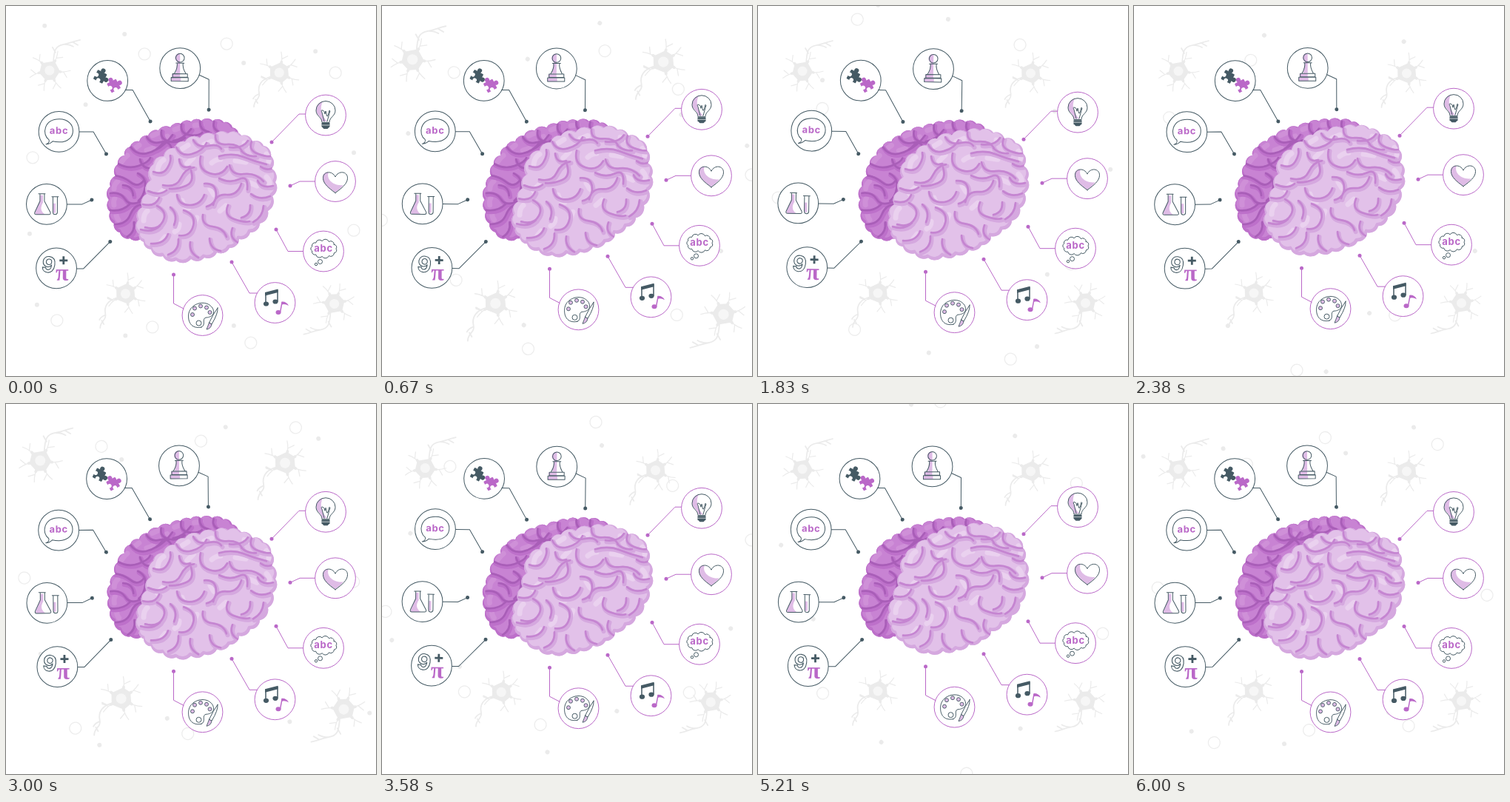
Write an HTML page that moves like this. It is 500 px wide and 500 px high and loops after 6040 ms.

```html
<!DOCTYPE html>
<html lang="en">
<head>
<meta charset="utf-8">
<title>Brain skills</title>
<style>
html, body { margin: 0; width: 100%; height: 100%; overflow: hidden; background: #fff; }
svg { display: block; width: 100vw; height: 100vh; }
path, line { stroke-linecap: round; stroke-linejoin: round; }
.line { fill: none; }
.ink { fill: none; stroke: #455a64; }
.solid { fill: #455a64; }
.lilac { fill: #dfbce6; }
.pink { fill: #ba68c8; }
.word { font: 700 13px Inter, "Open Sans", sans-serif; letter-spacing: .7px; text-anchor: middle; fill: #ba68c8; }
</style>
</head>
<body>
<svg id="stage" viewBox="0 0 500 500">
  <g id="orbit" fill="none" stroke="#ededed" stroke-width="1.3"></g>
  <g id="neurons" fill="none" stroke="#ebebeb"></g>

  <g id="left">
    <g id="darkHalf"></g>
    <g id="leftLinks"></g>

    <g id="pawn">
      <path class="lilac" d="M231 77L229 91H235V64A6 6 0 0 0 231 75ZM224 91.500h11v5h-11zM223 97h13v4.500h-13z"/>
      <circle class="ink" cx="235" cy="70" r="5.800"/>
      <path class="ink" d="M229.500 77h11M231 77C232 84 229 88 227 91.500M239 77C238 84 241 88 243 91.500M225 91.500h20v4.500h-20zM223 96.500h23v5h-23z"/>
    </g>

    <g id="puzzle"></g>

    <g id="speech">
      <path class="ink" d="M58 181C48 174 51 153 72 153C96 153 97 184 72 184C68 184 65 183.500 63 183C60 186 57 187 54 187C57 186 59 184 58 181Z"/>
      <text class="word" x="71.500" y="173">abc</text>
    </g>

    <g id="lab">
      <path class="lilac" d="M46 263L39.500 279Q39 282 42 282H53Q44 276 50 266V256H46ZM63.500 267h3.500v13h-3.500z"/>
      <path class="ink" d="M44 254h9M46 254V264L39 279Q38 282 41 282H58Q61 282 60 279L52 264V254M62 258h9M63.500 258V279a3 3 0 0 0 6 0V258"/>
    </g>

    <g id="maths">
      <text x="58" y="360" text-anchor="middle" transform="rotate(8 58 350)" fill="#fff" stroke="#455a64" stroke-width="1.100" style="font:700 29px Inter,sans-serif">9</text>
      <path class="ink" stroke-width="2.800" style="stroke-linecap:butt" d="M72.500 344h11M78 338.500v11"/>
      <text x="76" y="371" text-anchor="middle" class="pink" style="font:700 32px 'Liberation Serif',serif">π</text>
    </g>
  </g>

  <g id="right">
    <g id="lightHalf"></g>
    <g id="rightLinks"></g>

    <g id="bulb">
      <path class="lilac" d="M427 156C427 149 419 148 419 140C419 134 423 130 428 129C423 139 427 149 434 156Z"/>
      <path class="ink" d="M427 157C427 150 419 149 419 141A13 12.500 0 0 1 445 141C445 149 437 150 437 157ZM430 156L427 144Q425 140 428 141T431 146Q432 138 433 146T437 141Q439 141 437 145L434 156"/>
      <path class="solid" d="M426.500 158h11v5l-3 3h-5l-3-3z"/>
      <path d="M427 161h10" stroke="#fff" stroke-width=".7"/>
    </g>

    <g id="heart">
      <path class="lilac" d="M445 252C436 246 428 240 428 232C428 226 432 224 436 225C432 233 442 244 456 242C453 246 449 249 445 252Z"/>
      <path class="ink" d="M445 252.500C436 246 428.500 240 428.500 232.500C428.500 223 441 222 445 231C449 222 461.500 223 461.500 232.500C461.500 240 454 246 445 252.500Z"/>
    </g>

    <g id="thought">
      <path id="cloud" class="ink"/>
      <circle class="ink" cx="424.500" cy="345.500" r="3"/>
      <circle class="ink" cx="419" cy="349" r="1.700"/>
      <text class="word" x="429" y="332">abc</text>
    </g>

    <g id="music">
      <ellipse class="solid" cx="351.500" cy="402.500" rx="3.600" ry="3.100"/>
      <ellipse class="solid" cx="364" cy="399.500" rx="3.600" ry="3.100"/>
      <path class="ink" stroke-width="1.500" d="M351 402V388M367 399V384"/>
      <path class="solid" d="M350 387L367.500 382.500V387L350 391.500Z"/>
      <ellipse class="pink" cx="368" cy="414" rx="3.500" ry="3"/>
      <path class="line" stroke="#ba68c8" stroke-width="1.500" d="M370.500 414L373 400.500"/>
      <path class="pink" d="M372.500 399.500Q379 399 382 405Q377 402 372.500 403.500Z"/>
    </g>

    <g id="palette">
      <path class="ink" d="M264 434C250 437 245 426 247 415C250 401 271 396 279 408C284 417 276 421 270 421C264 423 271 431 264 434Z"/>
      <g id="paints" class="lilac" stroke="#455a64" stroke-width=".9"></g>
      <circle class="ink" cx="260.500" cy="428.500" r="3.500"/>
      <path fill="#fff" stroke="#455a64" d="M286 408Q287 415 278 430L274.500 428Q280 416 286 408Z"/>
      <path class="lilac" stroke="#455a64" stroke-width=".9" d="M274.500 428L278 430Q277 436 271 437Q273 432 274.500 428Z"/>
    </g>
  </g>
</svg>

<script>
const LOOP = 6040;
const BEAT = 1500;
const DARK = '#455a64', PINK = '#ba68c8';
const byId = id => document.getElementById(id);

function add(parent, tag, attrs) {
  const node = document.createElementNS('http://www.w3.org/2000/svg', tag);
  for (const key in attrs) node.setAttribute(key, attrs[key]);
  parent.appendChild(node);
  return node;
}

// Closed outline of outward bulges between clockwise points.
function bumps(points, round = .7) {
  const last = points[points.length - 1];
  let from = last, d = `M${last}`;
  for (const to of points) {
    const r = Math.hypot(to[0] - from[0], to[1] - from[1]) * round;
    d += `A${r} ${r} 0 0 1 ${to}`;
    from = to;
  }
  return d + 'Z';
}

const pairs = text => text.split(' ').map(p => p.split(',').map(Number));

// Brain
function hemisphere(id, outline, tone, folds, glow) {
  const group = byId(id), shape = bumps(outline);
  const clip = add(group, 'clipPath', { id: id + 'Clip' });
  add(clip, 'path', { d: shape });
  add(group, 'path', { d: shape, fill: tone.base });
  const inner = add(group, 'g', { 'clip-path': `url(#${id}Clip)`, fill: 'none' });
  add(inner, 'path', { d: shape, stroke: tone.shade, 'stroke-width': 5, transform: 'translate(-1 -2)' });
  add(inner, 'path', { d: glow, stroke: tone.glow, 'stroke-width': 7 });
  add(inner, 'path', { d: folds, stroke: tone.shade, 'stroke-width': 6, transform: 'translate(1.5 2)' });
  add(inner, 'path', { d: folds, stroke: tone.fold, 'stroke-width': 2.7 });
}

const darkOutline = pairs('183,314 168,314 154,306 146,294 141,278 139,262 141,244 148,230 151,214 160,202 168,190 180,183 192,175 206,168 222,164 236,159 250,156 264,155 279,155 294,157 306,164 314,174 314,200 200,300');
const lightOutline = pairs('180,308 178,290 184,272 190,254 195,236 199,214 213,203 228,192 242,183 262,178 282,174 300,172 318,175 333,183 348,189 358,203 359,220 364,238 360,257 354,277 343,294 330,306 315,315 302,327 285,333 268,340 250,342 230,344 212,338 196,329 186,319');

hemisphere('darkHalf', darkOutline,
  { base: '#c883d3', shade: '#bd70ca', fold: '#a95eb8', glow: '#cf90d8' },
  'M146 229q12 1 22 9t18-2M151 213q14 8 28 3t16-11M168 190q8 12 22 9t22-14M190 177q6 10 18 7t16 8' +
  'M210 168q-2 12 10 15t22-5M237 159q-2 13 10 15t18-3M262 156q0 12 12 14M281 156q-3 10 8 15' +
  'M141 253q14-2 20 8t22 3M141 276q16 2 26-8M147 295q16 0 21-13t16-14M164 312q11-7 9-20' +
  'M178 226q12 6 10 19t-9 18M158 242q13 1 14 14M181 207q4 14 16 12M225 174q-10 14-22 20M250 166q-10 14-24 16',
  'M146 247q0-6 5-10M156 211q4-6 8-9M172 194l8-6M146 269q-1-6 1-9M198 175l9-4M228 167l8-3M255 161l9-1M152 289q-3-4-3-8M190 195l9-3M212 179l6-3');

const upperFolds =
  'M230 191q6 13 21 9t20-15M253 181q6 11 20 8t18 4M283 174q-1 14 15 13t21 9M302 191q18 2 25-9' +
  'M332 183q-5 12 9 17t19 2M288 203q18-5 33 1t31 10M344 217q8 6 17 2M199 224q13 5 19-5t4-17' +
  'M212 242q18 4 24-9t18-15M263 203q-4 18 12 23t24-9M302 215q3 14 19 12t27 10M250 222q5 16-7 21t-22 4' +
  'M192 250q15 7 25-1M340 236q5 11 21 7M234 207q2 14 15 10M318 196q8 8 20 7';
const lowerFolds =
  'M268 240q15-1 16 13t-13 18M288 233q14 7 27 1t11 14M318 240q-5 16-20 15t-18 14M331 254q11 9 26 3' +
  'M231 255q2 14 17 14t20-14M185 268q17 4 22-9M204 270q15 8 8 21t-24 8M222 272q11 9 5 24' +
  'M240 276q17 6 13 21t-19 13M266 282q-2 14 13 16t19 14M300 269q-6 14 8 19t21 3M330 269q1 14-12 17' +
  'M348 270q-1 15-14 22M182 302q16 5 26-5M196 321q18 1 23-13M219 336q15-5 14-21M249 319q-2 14 11 21M275 314q1 15 15 17M306 300q-5 13 8 20';
hemisphere('lightHalf', lightOutline,
  { base: '#e2c1e9', shade: '#d5a8df', fold: '#c585d1', glow: '#ead1ef' },
  upperFolds + lowerFolds,
  'M205 222q1-10 8-14M238 193l8-5M268 187l10-4M322 185l9 3M352 200q4 6 3 10M186 290q0-9 5-13M205 258q4-7 9-10' +
  'M245 213l8-8M278 212q6-5 12-5M310 209l14 2M352 231q5 5 4 11M276 247l5 8M238 263q2 9 9 10M228 305q6-3 6-10M289 277l8-7M330 239l9 4M255 294l3-8M210 318l5-6');

// Callouts
function links(id, color, rows) {
  for (const [x, y, route, tip] of rows) {
    const g = byId(id);
    add(g, 'circle', { cx: x, cy: y, r: 27.4, fill: '#fff', stroke: color });
    add(g, 'path', { d: `M${route}L${tip}`, fill: 'none', stroke: color });
    const [cx, cy] = tip.split(' ');
    add(g, 'circle', { cx, cy, r: 2.5, fill: color });
  }
}
links('leftLinks', DARK, [
  [235, 84, '261 93L274 99', '274 140'],
  [137, 101, '161 113.500H171', '195 156'],
  [71.5, 170, '99 170H118', '135.500 200'],
  [55, 268, '82.500 268H103', '116 262'],
  [68.3, 354.5, '96 355H105', '141 318.500']
]);
links('rightLinks', PINK, [
  [432, 147.5, '404.500 146H396', '359 184'],
  [445, 237, '417.500 237H397', '384 243'],
  [429, 331.5, '401.500 331.500H381', '365 302'],
  [363.5, 401, '339 388H329', '305 346'],
  [265.5, 418, '240 409L226.500 402', '226.500 363']
]);

function puzzlePiece(x, y, fill, turn) {
  const g = add(byId('puzzle'), 'g', { transform: `translate(${x} ${y}) rotate(${turn})`, fill });
  add(g, 'rect', { x: -7, y: -7, width: 14, height: 14, rx: 1 });
  for (const [cx, cy] of [[9, 0], [0, -9]]) add(g, 'circle', { cx, cy, r: 3.1 });
  for (const [cx, cy] of [[-5.5, 0], [0, 5.5]]) add(g, 'circle', { cx, cy, r: 2.8, fill: '#fff' });
}
puzzlePiece(127, 95.5, DARK, 28);
puzzlePiece(145.500, 108, PINK, -28);

const cloud = Array.from({ length: 11 }, (_, i) => {
  const a = i / 11 * 2 * Math.PI;
  return [429.5 + 16.5 * Math.cos(a), 328 + 10.5 * Math.sin(a)];
});
byId('cloud').setAttribute('d', bumps(cloud, .56));

for (const [cx, cy] of pairs('252,417 255,408.5 263,405.5 271,407.5 275.5,414'))
  add(byId('paints'), 'circle', { cx, cy, r: 2.5 });

// Background
const orbit = byId('orbit');
for (const [cx, cy] of pairs('187,65 298,51 445,90 36,205 470,303 198,434 69,425 331,455'))
  add(orbit, 'circle', { cx, cy, r: 8 });
for (const [cx, cy] of pairs('52,27 160,38 321,77 418,61 470,198 107.5,133.5 32,308 42,404 161.5,445.5 308,432'))
  add(orbit, 'circle', { cx, cy, r: 3, fill: '#ebebeb', stroke: 'none' });

function neuron(x, y, turn, axon, arms) {
  const g = add(byId('neurons'), 'g', { transform: `translate(${x} ${y}) rotate(${turn})` });
  add(g, 'path', { d: axon, 'stroke-width': 1.7 });
  const body = [];
  for (const deg of arms) {
    const a = deg * Math.PI / 180;
    const at = (r, bend) => `${r * Math.cos(a + bend)} ${r * Math.sin(a + bend)}`;
    body.push([13 * Math.cos(a), 13 * Math.sin(a)]);
    add(g, 'path', { d: `M${at(10, 0)}Q${at(18, .1)} ${at(28, -.08)}M${at(19, .03)}L${at(25, .3)}`, 'stroke-width': 1.2 });
    add(g, 'path', { d: `M${at(9, 0)}L${at(15, .04)}`, 'stroke-width': 3.5 });
  }
  add(g, 'path', { d: `M${body.join('L')}Z`, fill: '#ebebeb', 'stroke-width': 2 });
  add(g, 'circle', { r: 6.5, fill: '#f6f6f6', stroke: 'none' });
}
const upAxon = 'M5-10C6-28 8-33 19-35S31-39 41-41M20-35Q27-35 32-32M31-38L38-34M8-24L4-31';
const downAxon = 'M-9 5C-25 8-29 18-27 27S-34 36-34 46M-28 29Q-33 31-35 35M-32 36L-29 41M-18 8L-24 5';
const upArms = [-138, -195, -250, 62, 5, -62], downArms = [-80, -35, 25, 75, 148, -150];
neuron(60, 88, 0, upAxon, upArms);
neuron(442.5, 401.5, 180, upAxon, upArms);
neuron(368.5, 91, 0, downAxon, downArms);
neuron(162, 388, 0, downAxon, downArms);

// Motion
function track(x, keys) {
  for (let i = 1; i < keys.length; i++) {
    const [x0, y0] = keys[i - 1], [x1, y1] = keys[i];
    if (x <= x1) return y0 + (y1 - y0) * (x - x0) / (x1 - x0);
  }
  return keys[keys.length - 1][1];
}
const sway = [[0, 0], [.25, 1], [.75, -1], [1, 0]];
const lift = [[0, 0], [.5, -10], [1, 0]];
const pulse = [[0, 1], [.1, 1.1], [.3, 1], [.4, 1], [.5, 1.1], [.6, 1], [1, 1]];
const move = (id, value) => byId(id).setAttribute('transform', value);

function draw(t) {
  // The clock runs slightly slow and skips ahead four times per loop.
  const clock = 35 + .862 * t + 212 * Math.floor(t / (LOOP / 4));
  const beat = clock % BEAT / BEAT;
  move('orbit', `rotate(${(clock - 35) * .06} 251 245.5)`);
  move('neurons', `translate(250 247) scale(${track(clock / 6000, pulse)}) translate(-250 -247)`);
  move('left', `rotate(${track(beat, sway)} 156 217)`);
  move('right', `translate(0 ${track(beat, lift) + .5})`);
}

const start = performance.now();
function tick() {
  draw((performance.now() - start) % LOOP);
  requestAnimationFrame(tick);
}
draw(0);
requestAnimationFrame(tick);
</script>
</body>
</html>
```
